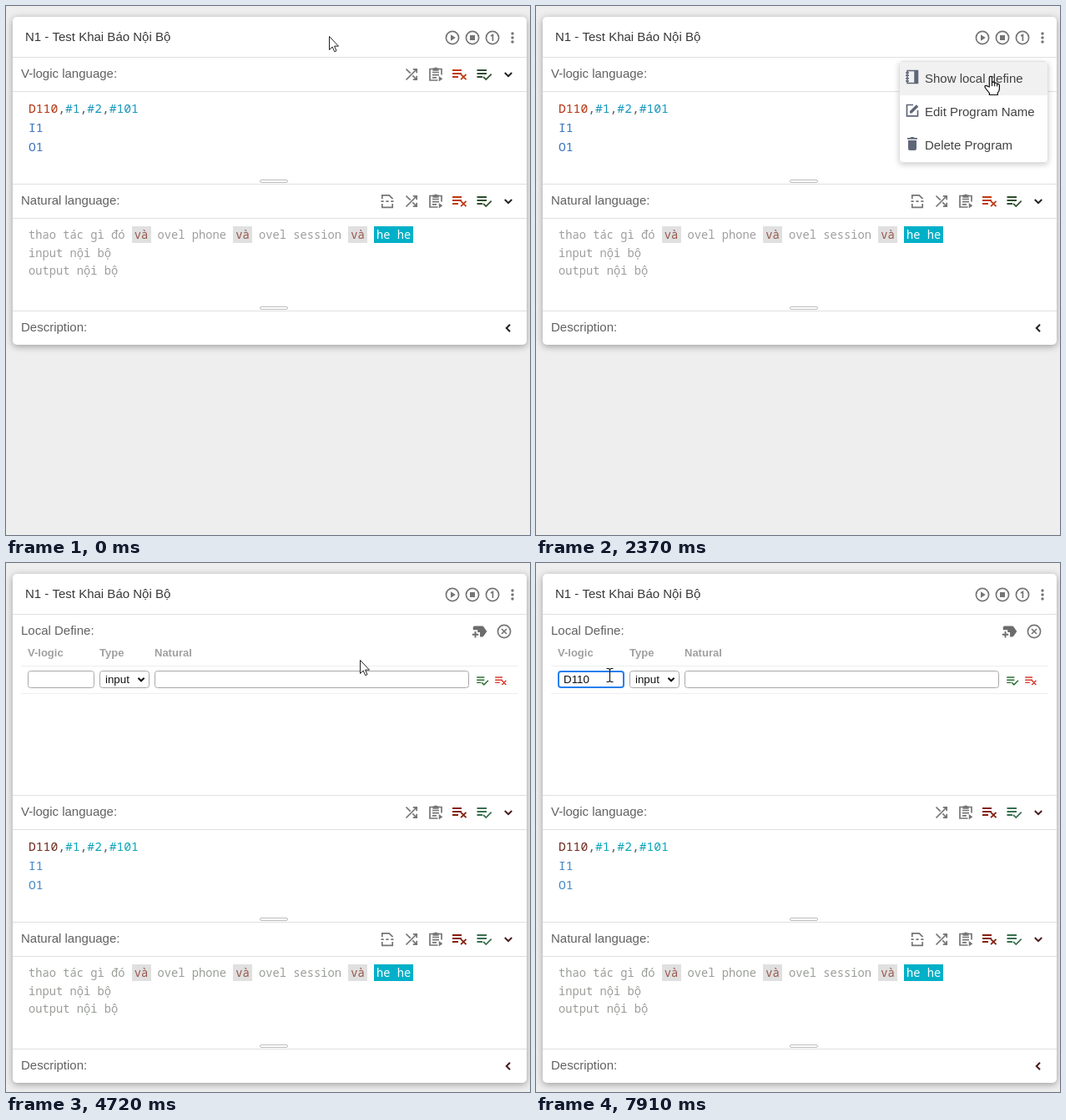
Write an HTML page with a canvas that moves like this. It is 628 px wide and 634 px high and loops after 8 s.

```html
<!DOCTYPE html>
<html lang="vi">
<head>
<meta charset="utf-8">
<title>Local define</title>
<style>
  html, body { margin: 0; width: 100%; height: 100%; overflow: hidden; background: #eee; }
  canvas { display: block; }
</style>
</head>
<body>
<canvas id="stage" width="628" height="634"></canvas>
<script>
const ctx = document.getElementById('stage').getContext('2d');
const LOOP = 8000;
const SANS = '"Liberation Sans", Arial, sans-serif';
const MONO = '"Noto Sans Mono", "DejaVu Sans Mono", monospace';
const GREY = '#757575';

const T = { menu: 1860, panel: 2540, row: 4050, focus: 5570 };

// Start time, pointer kind, hot spot
const pointerSteps = [
  [0, 'arrow', 387, 36], [500, 'arrow', 394, 38], [670, 'arrow', 428, 40],
  [840, 'arrow', 482, 40], [1010, 'hand', 534, 39], [1180, 'hand', 562, 38],
  [1350, 'hand', 584, 38], [1520, 'hand', 608, 39], [1690, 'hand', 607, 39],
  [2030, 'hand', 598, 55], [2200, 'hand', 568, 76], [2370, 'hand', 545, 84],
  [2540, 'arrow', 543, 84], [3040, 'arrow', 543, 86], [3370, 'arrow', 552, 85],
  [3540, 'hand', 564, 81], [3710, 'hand', 568, 80], [4390, 'hand', 567, 81],
  [4720, 'arrow', 424, 116], [4890, 'arrow', 334, 122], [5060, 'beam', 240, 138],
  [5230, 'arrow', 150, 144], [5400, 'beam', 98, 139], [5570, 'beam', 88, 135],
  [7910, 'beam', 88, 134]
];

const light = { red: '#bf3a14', green: '#2f4f2f', chevron: '#212121',
  call: '#b5330f', arg: '#1595bb', io: '#3a72be', text: '#9e9e9e' };
const dark = { red: '#84200f', green: '#39704f', chevron: '#4a1c1c',
  call: '#71291c', arg: '#09a4ba', io: '#4388c6', text: '#9a9e98' };

const within = (t, ...spans) => spans.some(([a, b]) => t >= a && t < b);

function text(str, x, y, color, font = '15px ' + SANS) {
  ctx.font = font;
  ctx.fillStyle = color;
  ctx.fillText(str, x, y);
}

function rect(x, y, w, h, color) {
  ctx.fillStyle = color;
  ctx.fillRect(x, y, w, h);
}

function box(x, y, w, h, r, fill, line, width = 1) {
  ctx.beginPath();
  ctx.roundRect(x, y, w, h, r);
  if (fill) { ctx.fillStyle = fill; ctx.fill(); }
  if (line) { ctx.strokeStyle = line; ctx.lineWidth = width; ctx.stroke(); }
}

function shadowBox(x, y, w, h, r, blur, alpha) {
  ctx.save();
  ctx.shadowColor = `rgba(0,0,0,${alpha})`;
  ctx.shadowBlur = blur;
  ctx.shadowOffsetY = 2;
  box(x, y, w, h, r, '#fff');
  ctx.restore();
}

// Draws an SVG path with its own origin at x, y
function shape(d, x, y, { fill, line, width = 1.7, scale = 1 }) {
  const path = new Path2D(d);
  ctx.save();
  ctx.translate(x, y);
  ctx.scale(scale, scale);
  if (fill) { ctx.fillStyle = fill; ctx.fill(path); }
  if (line) { ctx.strokeStyle = line; ctx.lineWidth = width; ctx.stroke(path); }
  ctx.restore();
}

function ring(x, y) {
  ctx.beginPath();
  ctx.arc(x, y, 7.6, 0, Math.PI * 2);
  ctx.strokeStyle = GREY;
  ctx.lineWidth = 1.7;
  ctx.stroke();
}

const icons = {
  shuffle(x, y) {
    shape('M-6.5-6.5L-1.3-1.3M-6.5 6.5L6-6M1.3 1.3L6 6M1.8-6.2H6.2V-1.8M1.8 6.2H6.2V1.8', x, y, { line: GREY });
  },
  paste(x, y) {
    shape('M2.5 7H-7V-6.5H7V.5M-4 -2.5H4M-4 .7H4M-4 3.9H1', x, y, { line: GREY });
    shape('M-3.6-7.4H-1.8A2 2 0 0 1 1.8-7.4H3.6V-4.2H-3.6ZM3.8 2L8.3 5.3L3.8 8.6Z', x, y, { fill: GREY });
  },
  split(x, y) {
    shape('M-6.2-2.7V-7.2H2.2L6.2-3.2V-2.7M-6.2 3V7.4H6.2V3M-7.5 .2H-4.3M-1.6 .2H1.6M4.3 .2H7.5', x, y, { line: GREY });
  },
  remove(x, y, color, scale = 1) {
    shape('M-8.5-5H2.5M-8.5-1H2.5M-8.5 3H-1.5M1.6-.2L8 6.2M8-.2L1.6 6.2', x, y, { line: color, width: 1.8, scale });
  },
  accept(x, y, color, scale = 1) {
    shape('M-8.5-5H3M-8.5-1H3M-8.5 3H-2M-1 2.8L2.3 6.1L8.7-.3', x, y, { line: color, width: 1.8, scale });
  },
  down(x, y, color) {
    shape('M-4.2-2L0 2.2L4.2-2', x, y, { line: color, width: 2 });
  },
  left(x, y, color) {
    shape('M2-4.2L-2.2 0L2 4.2', x, y, { line: color, width: 2 });
  },
  tag(x, y, color) {
    shape('M21 12l-4.4 6.2c-.4.5-1 .8-1.6.8h-3v-6H9v-3H3V7c0-1.1.9-2 2-2h10c.7 0 1.3.3 1.6.8zM10 15H7v-3H5v3H2v2h3v3h2v-3h3z',
      x - 11, y - 11, { fill: color, scale: 0.92 });
  },
  close(x, y) {
    ring(x, y);
    shape('M-3-3L3 3M3-3L-3 3', x, y, { line: GREY });
  },
  book(x, y, color) {
    shape('M-6-7.5H6.5V7.5H-6ZM3-7.5V7.5M-8-5H-4M-8-1.7H-4M-8 1.7H-4M-8 5H-4', x, y, { line: color, width: 1.5 });
    rect(x + 3, y - 8, 4, 16, color);
  },
  edit(x, y, color) {
    shape('M1-6.5H-6.5V6.8H6.5V0', x, y, { line: color });
    shape('M-3 1L4.8-6.8L7.3-4.3L-.5 3.5H-3Z', x, y, { fill: color });
  },
  bin(x, y, color) {
    shape('M-6-7H-2.5L-1.5-8H1.5L2.5-7H6V-5.2H-6ZM-5-4H5V6Q5 8 3 8H-3Q-5 8-5 6Z', x, y, { fill: color });
  }
};

function hover(x, y) {
  box(x - 11.5, y - 11.5, 23, 23, 2, '#d8d8d8', '#c2c2c2');
}

function topBar(t) {
  text('N1 - Test Khai Báo Nội Bộ', 23, 42, '#383838');
  if (within(t, [170, 670], [1180, 1690])) rect(196, 28, 1, 17, '#222');
  if (within(t, [1010, 1180])) hover(535, 38);
  if (within(t, [1180, 1350])) hover(559, 38);
  if (within(t, [1350, 1520])) hover(583, 38);
  if (within(t, [1520, 2030])) hover(607, 38);
  [535, 559, 583].forEach(x => ring(x, 38));
  shape('M-2-3.8L3.8 0L-2 3.8Z', 535, 38, { fill: GREY });
  rect(556, 35, 6, 6, GREY);
  shape('M-2-2L.4-3.5V4', 583, 38, { line: GREY });
  [33, 38, 43].forEach(y => {
    ctx.beginPath();
    ctx.arc(607, y, 1.75, 0, Math.PI * 2);
    ctx.fillStyle = GREY;
    ctx.fill();
  });
}

function toolIcons(y, colors) {
  icons.shuffle(486, y);
  icons.paste(515, y);
  icons.remove(543.5, y, colors.red);
  icons.accept(573, y, colors.green);
  icons.down(602, y, colors.chevron);
}

const separator = y => rect(8, y, 616, 1, '#e0e0e0');

function grip(y) {
  box(304.5, y + 0.5, 33, 3, 1.5, '#fff', '#bdbdbd');
}

// Runs are [string, colour, optional background]; marked runs get side padding
function runs(list, x, y, size) {
  const font = `${size}px ${MONO}`;
  for (const [str, color, back] of list) {
    ctx.font = font;
    const w = ctx.measureText(str).width;
    if (back) {
      rect(Math.round(x), y - 15, Math.round(w + 6), 20, back);
      x += 3;
    }
    text(str, x, y, color, font);
    x += w + (back ? 3 : 0);
  }
}

function editors(dy, c) {
  ctx.save();
  ctx.translate(0, dy);
  [102, 213, 254, 365].forEach(separator);
  text('V-logic language:', 18, 86, '#616161');
  toolIcons(82, c);
  runs([['D110', c.call], [',', '#555'], ['#1', c.arg], [',', '#555'], ['#2', c.arg],
    [',', '#555'], ['#101', c.arg]], 27, 128, 14.66);
  runs([['I1', c.io]], 27, 151, 14.66);
  runs([['O1', c.io]], 27, 174, 14.66);
  grip(208);

  text('Natural language:', 18, 238, '#616161');
  icons.split(457, 234);
  toolIcons(234, c);
  const and = ['và', '#96574c', '#e0e0e0'];
  runs([['thao tác gì đó ', c.text], and, [' ovel phone ', c.text], and,
    [' ovel session ', c.text], and, [' ', c.text], ['he he', '#fff', '#00b0c8']], 27, 279, 13.75);
  runs([['input nội bộ', c.text]], 27, 301, 13.75);
  runs([['output nội bộ', c.text]], 27, 322, 13.75);
  grip(360);

  text('Description:', 18, 390, '#616161');
  icons.left(602, 386, c.chevron);
  ctx.restore();
}

function menu() {
  shadowBox(435, 66, 179, 122, 4, 7, 0.2);
  box(435.5, 66.5, 178, 121, 4, '#fff', '#e0e0e0');
  rect(436, 67, 177, 40, '#f1f1f1');
  const ink = '#5f6678';
  icons.book(451, 85, ink);
  icons.edit(451, 125, ink);
  icons.bin(451, 165, ink);
  ['Show local define', 'Edit Program Name', 'Delete Program'].forEach((label, i) =>
    text(label, 466, 92 + i * 40, '#424242'));
}

function entryRow(t) {
  const font = '13.33px ' + SANS;
  const focused = t >= T.focus;
  if (focused) box(27, 130, 78, 19, 3, '#fff', '#2680ee', 2);
  else box(26.5, 129.5, 79, 20, 3, '#fff', '#a8a8a8');
  box(112.5, 129.5, 59, 20, 3, '#fff', '#a8a8a8');
  box(178.5, 129.5, 376, 20, 3, '#fff', '#a8a8a8');
  text('input', 119, 144, '#111', font);
  shape('M-3.6-1.8L0 1.8L3.6-1.8', 162, 139.5, { line: '#111', width: 2 });
  icons.accept(571, 141, '#2a7030', 0.8);
  icons.remove(593, 141, '#d83a2c', 0.8);
  rect(18, 156, 596, 1, '#eee');

  const keyTimes = [6070, 6900, 7070, 7240];
  const typed = 'D110'.slice(0, keyTimes.filter(k => t >= k).length);
  text(typed, 33, 144, '#111', font);
  if (within(t, [T.focus, 5900], [6070, 6570], [6900, 7740])) {
    rect(Math.round(33 + ctx.measureText(typed).width) - (typed.length > 1 ? 1 : 0), 132, 1, 15, '#111');
  }
}

function definePanel(t) {
  separator(278);
  text('Local Define:', 18, 86, '#616161');
  if (within(t, [2540, 3040], [3540, 4050])) rect(18, 72, 1, 17, '#222');
  const head = 'bold 13px ' + SANS;
  text('V-logic', 26, 112, '#a0a0a0', head);
  text('Type', 112, 112, '#a0a0a0', head);
  text('Natural', 178, 112, '#a0a0a0', head);
  rect(18, 123, 596, 1, '#eee');
  if (within(t, [3540, 4720])) hover(568, 82);
  icons.tag(568, 82, t < 3540 ? '#827a78' : '#6c6c6c');
  icons.close(597, 82);
  if (t >= T.row) entryRow(t);
}

const pointers = {
  arrow(x, y) {
    shape('M.5.5V16.5L4.2 13L6.7 18.7L9 17.7L6.6 12.1H11.5Z', x, y, { fill: '#fff', line: '#222', width: 1 });
  },
  hand(x, y) {
    shape('M-1.7 13V1.8Q-1.7 .4-.1 .4Q1.5 .4 1.5 1.8V7.4Q4.4 6.6 4.7 8.4Q7.4 7.6 7.6 9.5Q10.4 9 10.4 11.2V15Q10.4 18 8.3 20V22.5H-1.6V20.5L-6.3 14.5Q-7.7 12.5-6.5 11.6Q-5.2 10.8-3.7 12.3Z',
      x, y, { fill: '#fff', line: '#111', width: 1.2 });
    shape('M1.5 7V12M4.7 8.4V12.3M7.6 9.5V12.6', x, y, { line: '#111', width: 1.1 });
  },
  beam(x, y) {
    shape('M-3.5-7.5H-1L.5-6.5L2-7.5H4.5M.5-6.5V7.5M-3.5 8.5H-1L.5 7.5L2 8.5H4.5', x, y, { line: '#111', width: 1.1 });
  }
};

function draw(t) {
  const open = t >= T.panel;
  rect(0, 0, 628, 634, '#eee');
  shadowBox(8, 13, 616, open ? 610 : 393, 5, 8, 0.35);
  separator(61);
  topBar(t);
  if (open) definePanel(t);
  editors(open ? 217 : 0, open ? dark : light);
  if (within(t, [T.menu, T.panel])) menu();
  const [, kind, x, y] = pointerSteps.findLast(step => t >= step[0]);
  pointers[kind](x, y);
}

const start = performance.now();
function tick(now) {
  draw(Math.max(0, now - start) % LOOP);
  requestAnimationFrame(tick);
}
draw(0);
requestAnimationFrame(tick);
</script>
</body>
</html>
```
